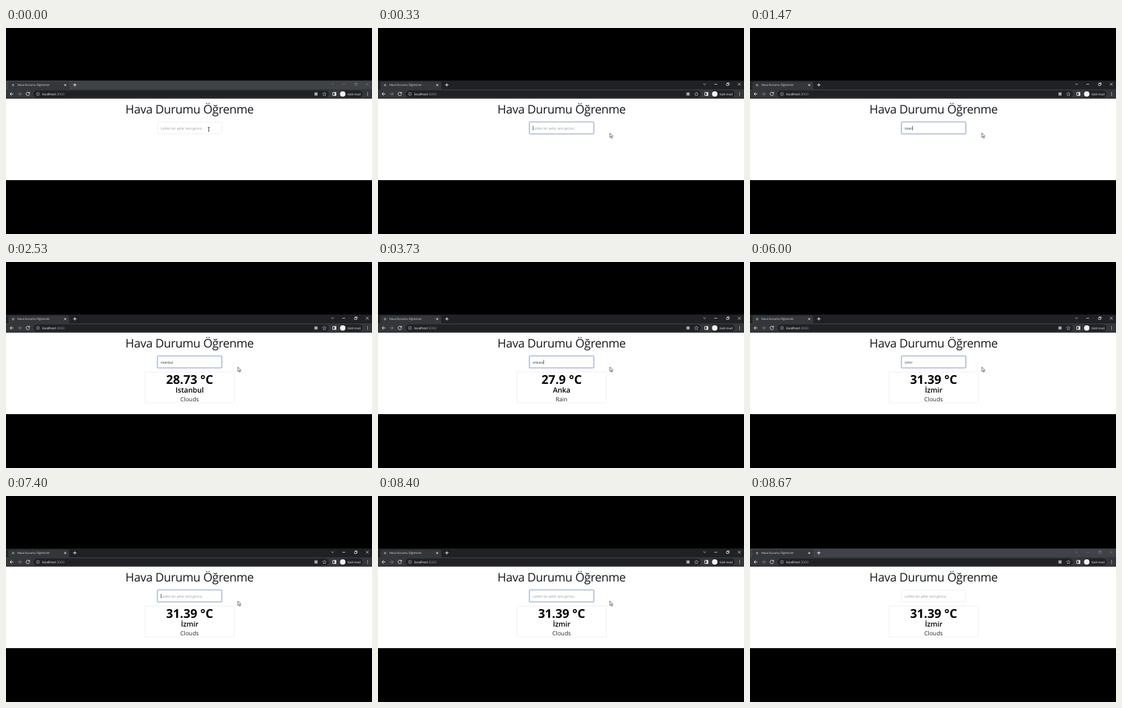
Write an HTML page that moves like this. It is 544x306 px and loops after 8740 ms.

```html
<!DOCTYPE html>
<html lang="tr">
<head>
<meta charset="utf-8">
<style>
  html, body { margin: 0; width: 100%; height: 100%; overflow: hidden; background: #000; }
  svg { display: block; width: 544px; height: 306px; }
  text { font-family: "Open Sans", "Noto Sans", sans-serif; text-rendering: geometricPrecision; white-space: pre; }
  .line { fill: none; stroke-width: .9; }
  .mid { text-anchor: middle; }
</style>
</head>
<body>
<svg viewBox="0 0 544 306">
  <rect width="544" height="306"/>

  <!-- browser bar -->
  <rect id="strip" y="78" width="544" height="14"/>
  <path d="M2 92q1.500 0 1.500-2v-8q0-2.500 2.500-2.500h85.500q2.500 0 2.500 2.500v8q0 2 1.500 2z" fill="#35363a"/>
  <rect y="91" width="544" height="14" fill="#35363a"/>
  <circle cx="10.500" cy="84.800" r="1.900" fill="#66858d"/>
  <text x="16.700" y="86.300" font-size="4.300" fill="#dfe1e5">Hava Durumu Öğrenme</text>
  <g class="line" stroke="#e8eaed">
    <path d="M86.500 83.200l3 3m0-3l-3 3M99.800 84.500h5m-2.500-2.500v5"/>
    <path d="M11 98H6m2.400-2.500L5.900 98l2.500 2.500"/>
    <path d="M17.500 98h5m-2.400-2.500l2.500 2.500-2.500 2.500" stroke="#85878b"/>
    <path d="M34.500 96.300a2.600 2.600 0 1 0 .5 2.200M35 95v2h-2"/>
  </g>
  <rect x="41" y="92.700" width="439" height="10.600" rx="5.300" fill="#202124"/>
  <g class="line" stroke="#bdc1c6" style="stroke-width:.6">
    <circle cx="47.500" cy="98" r="2.300"/>
    <path d="M47.500 97.700v1.600m0-2.900v.6"/>
    <path d="M473.300 95.300l.8 1.800 2 .2-1.500 1.400.4 2-1.700-1-1.700 1 .4-2-1.500-1.400 2-.2z"/>
  </g>
  <text x="53.700" y="99.800" font-size="4.900" fill="#fff">localhost<tspan fill="#9aa0a6">:3000</tspan></text>
  <rect x="458.500" y="95.700" width="4.600" height="4.600" fill="#a6a9ad"/>
  <path class="line" d="M485.700 95.700h4.600v4.600h-4.600z" stroke="#e8eaed"/>
  <path d="M488.300 95.500h2.200v5h-2.200z" fill="#e8eaed"/>
  <rect x="495.500" y="92.700" width="34.500" height="10.600" rx="5.300" fill="#202124"/>
  <circle cx="500.500" cy="98" r="4.100" fill="#f1f3f4"/>
  <text x="507.500" y="99.700" font-size="4.450" fill="#fff">Gizli mod</text>
  <path d="M537 95.500h1v1h-1zm0 2h1v1h-1zm0 2h1v1h-1z" fill="#e8eaed"/>
  <path id="controls" class="line" style="stroke-width:.7"
    d="M483.500 82.500l1.800 1.700 1.800-1.700M499.800 83.500h4.400M518 82.500h3v3h-3zM519 82.500v-1h3v3h-1M535 81.500l4 4m0-4l-4 4"/>

  <!-- page -->
  <rect y="105" width="544" height="121" fill="#fff"/>
  <text class="mid" x="272.800" y="126.500" font-size="17.600" letter-spacing="-.3" fill="#14181c">Hava Durumu Öğrenme</text>
  <rect id="ring" x="224.800" y="139.300" width="96.200" height="18.200" rx="1.800" fill="none" stroke="#c3d3ee" stroke-width="1.600"/>
  <rect id="field" x="225.300" y="139.800" width="95.200" height="17.200" rx="1.300" fill="#fff" stroke-width=".6"/>
  <text id="value" x="230" y="150.500" font-size="4.960"></text>
  <rect id="caret" y="145.300" width=".6" height="6.600" fill="#111"/>
  <g id="card" class="mid">
    <rect x="206.500" y="163.500" width="133" height="45.700" rx="1.500" fill="#fff" stroke="#000" stroke-opacity=".1" stroke-width=".6"/>
    <text id="temp" x="273" y="181.200" font-size="18" font-weight="700"></text>
    <text id="city" x="273" y="194.200" font-size="10.700" font-weight="600"></text>
    <text id="sky" x="272.800" y="206.600" font-size="8.600" fill="#212529"></text>
  </g>
  <path id="ibeam" class="line" d="M299.800 147.800h3m-1.500 0v5.400m-1 0h2" stroke="#222" style="stroke-width:.8"/>
  <path id="arrow" d="M0 0v6.600l1.500-1.400 1.100 2.500 1.100-.5-1.100-2.400h2z" fill="#fff" stroke="#222" stroke-width=".6"/>
</svg>
<script>
const LOOP = 8740, FOCUS = 130, BLUR = 8670, BLINK = 530;
const HINT = 'Lütfen bir şehir ismi giriniz...';

// [time, field value]
const edits = [
  [FOCUS, ''], [1200, 'i'], [1270, 'is'], [1330, 'ist'], [1400, 'ista'], [1470, 'istan'],
  [1600, 'istanb'], [1730, 'istanbu'], [1870, 'istanbul'],
  [3070, ''], [3200, 'a'], [3270, 'an'], [3400, 'ank'], [3470, 'anka'], [3600, 'ankar'], [3670, 'ankara'],
  [4800, ''], [4870, 'i'], [4930, 'iz'], [5000, 'izm'], [5070, 'izmi'], [5270, 'izmir'],
  [7400, '']
];
// [time, temperature, city, sky]
const reports = [
  [1930, '28.73', 'Istanbul', 'Clouds'],
  [3600, '27.9', 'Anka', 'Rain'],
  [3800, '28.66', 'Ankara', 'Clouds'],
  [5330, '31.39', 'İzmir', 'Clouds']
];

const el = id => document.getElementById(id);
const show = (id, on) => el(id).setAttribute('visibility', on ? 'visible' : 'hidden');
const paint = (id, name, value) => el(id).setAttribute(name, value);
const latest = (list, t) => list.filter(item => item[0] <= t).pop();

function draw(t) {
  const active = t >= FOCUS && t < BLUR;
  paint('strip', 'fill', active ? '#202124' : '#3f4246');
  paint('controls', 'stroke', active ? '#e8eaed' : '#73767a');
  paint('field', 'stroke', active ? '#8296b8' : '#e3e6e9');
  show('ring', active);

  const [since, typed] = latest(edits, t) || [0, ''];
  const value = el('value');
  value.textContent = typed;
  paint('caret', 'x', 230 + (typed ? value.getComputedTextLength() : 0));
  show('caret', active && (t - since) % (2 * BLINK) < BLINK);
  if (!typed) value.textContent = HINT;
  paint('value', 'fill', typed ? '#212529' : '#8c9197');

  const report = latest(reports, t);
  show('card', report);
  if (report) {
    el('temp').textContent = report[1] + ' °C';
    el('city').textContent = report[2];
    el('sky').textContent = report[3];
  }

  const move = Math.min(1, Math.max(0, (t - FOCUS) / 200));
  const overField = move < .4;
  show('ibeam', overField);
  show('arrow', !overField && t < BLUR);
  paint('arrow', 'transform', `translate(${301 + 43.700 * move} ${148 + 8 * move})`);
}

function tick() {
  draw(performance.now() % LOOP);
  requestAnimationFrame(tick);
}
tick();
</script>
</body>
</html>
```
